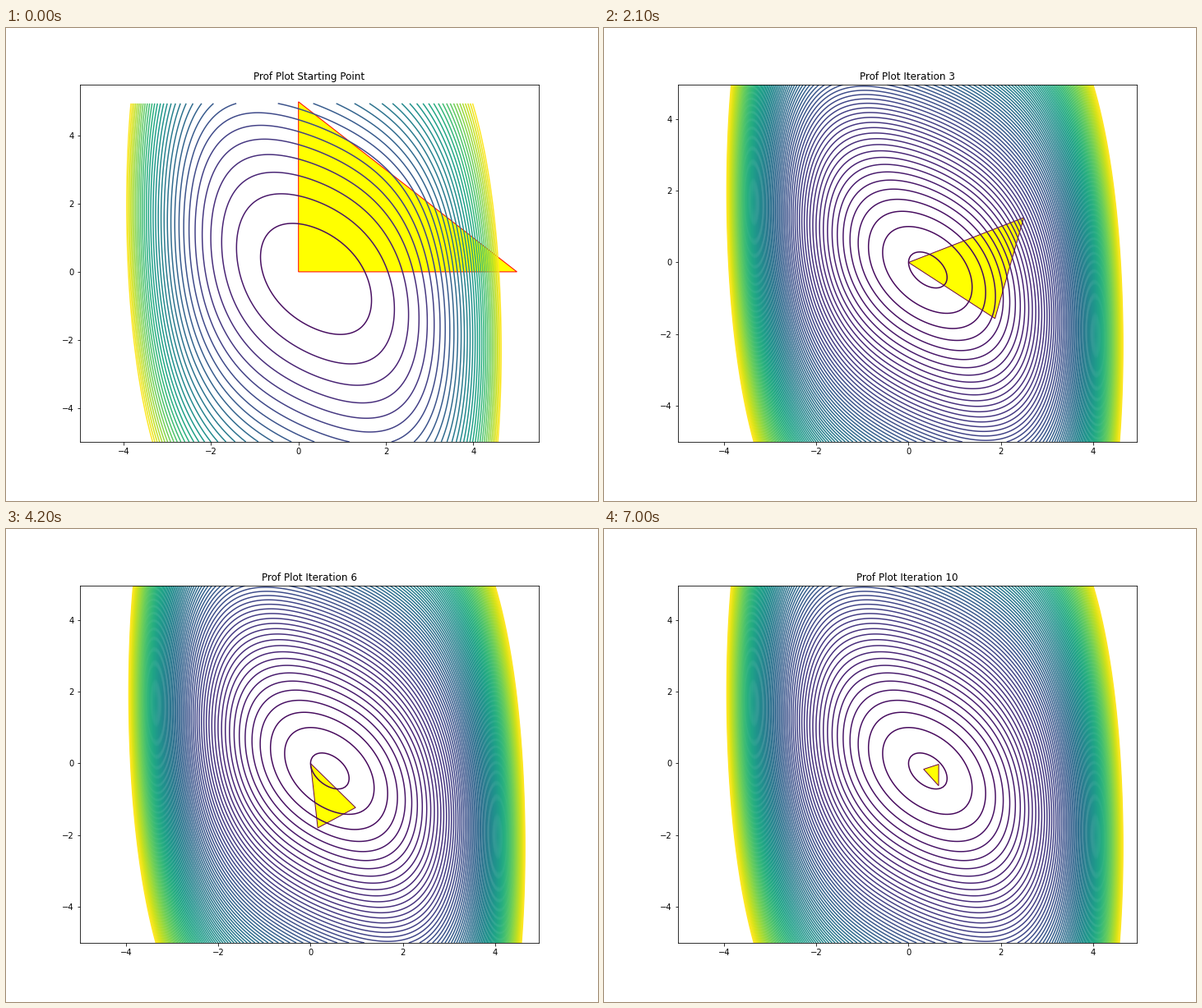
Animation, 720 px wide and 576 px high, one loop 7.7 s. Source, as a matplotlib script:

```python
import numpy as np
import matplotlib.pyplot as plt
from matplotlib.animation import FuncAnimation

STEPS = 10
LOW = -5


def f(x, y):
    return np.exp(x) + 2 * np.exp(-x) + (x * y + y * y)


def next_simplex(simplex):
    """Replace the worst vertex by its reflection, or contract it inwards."""
    ordered = sorted(simplex, key=lambda p: f(*p))
    kept, worst = ordered[:2], ordered[2]
    center = (kept[0] + kept[1]) / 2
    point = 2 * center - worst
    if f(*point) >= f(*worst):
        point = (center + worst) / 2
    return kept + [point]


simplices = [[np.array(p, float) for p in ((0, 0), (5, 0), (0, 5))]]
for _ in range(STEPS):
    simplices.append(next_simplex(simplices[-1]))

axis = np.arange(LOW, 5, 0.05)
X, Y = np.meshgrid(axis, axis)
Z = f(X, Y)

fig, ax = plt.subplots(figsize=(10, 8), dpi=72)
fig.subplots_adjust(left=0.125, right=0.9, bottom=0.125, top=0.88)


def upper_limit(values):
    """Grid edge, or the farthest vertex plus a 5% margin."""
    top = max(values)
    return axis[-1] if top <= axis[-1] else top + 0.05 * (top - LOW)


def draw(i):
    ax.clear()
    triangle = np.array(simplices[i])
    step, edge, title = (1, "#6b0848", f"Iteration {i}") if i else (3, "red", "Starting Point")
    ax.contour(X, Y, Z, levels=np.arange(2, 100, step))
    ax.add_patch(plt.Polygon(triangle, facecolor="yellow", edgecolor=edge))
    ax.set_xlim(LOW, upper_limit(triangle[:, 0]))
    ax.set_ylim(LOW, upper_limit(triangle[:, 1]))
    ax.set_title(f"Prof Plot {title}")
    return []


anim = FuncAnimation(fig, draw, frames=STEPS + 1, init_func=lambda: [],
                     interval=700, repeat=True, repeat_delay=0)
plt.show()
```
